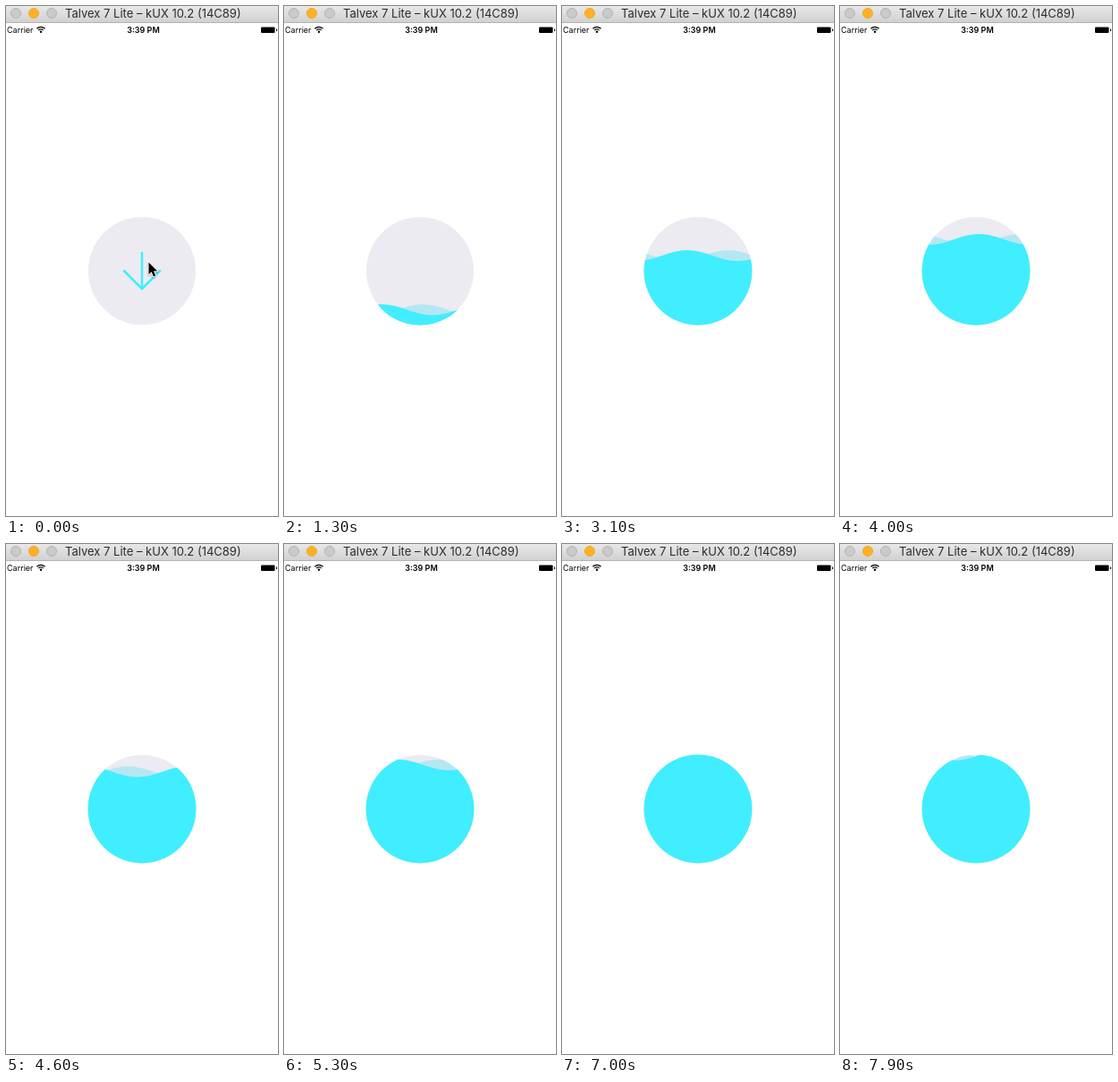
Animation of 304 by 568 pixels, one loop 8000 ms. Source, as an HTML page with a canvas:

```html
<!DOCTYPE html>
<html lang="en">
<head>
<meta charset="utf-8">
<title>Liquid download button</title>
<style>
  html, body { margin: 0; width: 100%; height: 100%; overflow: hidden; background: #fff; }
  canvas { display: block; width: 304px; height: 568px; }
</style>
</head>
<body>
<canvas id="stage" width="304" height="568"></canvas>
<script>
const ctx = document.getElementById('stage').getContext('2d');
const W = 304, H = 568, LOOP = 8000, STEP = 100;
const CX = 152, CY = 295, R = 60, WATER_R = 60.4;
const CYAN = '#40eeff', PALE = '#b5e7f2', DISC = '#ebebf1';
const FONT = 'Inter, Roboto, sans-serif';
const WAVE = { length: 113, height: 6, speed: -108.5, lead: 46 };

// Mean water height: [time in ms, y]
const LEVELS = [[700, 361], [2100, 308], [3100, 278], [4000, 260],
                [5300, 246], [6200, 236], [7000, 235]];

function levelAt(t) {
  if (t <= LEVELS[0][0]) return LEVELS[0][1];
  for (let i = 1; i < LEVELS.length; i++) {
    const [t0, y0] = LEVELS[i - 1], [t1, y1] = LEVELS[i];
    if (t <= t1) return y0 + (y1 - y0) * (t - t0) / (t1 - t0);
  }
  return LEVELS[LEVELS.length - 1][1];
}

function disc(x, y, r, fill, stroke) {
  ctx.beginPath();
  ctx.arc(x, y, r, 0, Math.PI * 2);
  ctx.fillStyle = fill;
  ctx.fill();
  if (!stroke) return;
  ctx.strokeStyle = stroke;
  ctx.lineWidth = 1;
  ctx.stroke();
}

function label(text, x, y, font, color, align = 'left') {
  ctx.font = `${font} ${FONT}`;
  ctx.fillStyle = color;
  ctx.textAlign = align;
  ctx.fillText(text, x, y);
}

function trace(points) {
  ctx.beginPath();
  points.forEach(([x, y], i) => i ? ctx.lineTo(x, y) : ctx.moveTo(x, y));
}

function titleBar() {
  const shade = ctx.createLinearGradient(0, 0, 0, 18);
  shade.addColorStop(0, '#e8e8e8');
  shade.addColorStop(1, '#d1d1d1');
  ctx.fillStyle = shade;
  ctx.fillRect(0, 0, W, 18);
  ctx.fillStyle = '#b3b3b3';
  ctx.fillRect(0, 18, W, 1);
  disc(11, 8, 5.5, '#cacaca', '#b4b4b4');
  disc(31, 8, 5.5, '#fdb225', '#f0a823');
  disc(51, 8, 5.5, '#cacaca', '#b4b4b4');
  label('Talvex 7 Lite – kUX 10.2 (14C89)', 66, 13, '13px', '#2c2c2c');
}

function statusBar() {
  label('Carrier', 1, 30, '9px', '#000');
  label('3:39 PM', 153.5, 30, '600 9px', '#000', 'center');

  ctx.strokeStyle = '#000';
  ctx.lineWidth = 1.3;
  for (const r of [3.6, 6.2]) {
    ctx.beginPath();
    ctx.arc(39, 29.5, r, -Math.PI * 0.76, -Math.PI * 0.24);
    ctx.stroke();
  }
  disc(39, 28.8, 1.2, '#000');

  ctx.fillStyle = '#000';
  ctx.beginPath();
  ctx.roundRect(285, 23.5, 15.5, 6.5, 1);
  ctx.fill();
  ctx.fillRect(302, 25.5, 1, 2.5);
}

function arrow(alpha) {
  ctx.save();
  ctx.globalAlpha = alpha;
  ctx.strokeStyle = CYAN;
  ctx.lineWidth = 2.5;
  ctx.lineCap = ctx.lineJoin = 'round';
  trace([[152, 275], [152, 315], [132, 295]]);
  ctx.moveTo(152, 315);
  ctx.lineTo(172, 295);
  ctx.stroke();
  ctx.restore();
}

function cursor() {
  ctx.save();
  ctx.translate(159.5, 285.5);
  ctx.scale(0.9, 0.9);
  trace([[0, 0], [0, 15], [3.4, 11.8], [6, 17.6], [8.6, 16.4], [6.1, 10.8], [10.8, 10.8]]);
  ctx.closePath();
  ctx.lineJoin = 'round';
  ctx.lineWidth = 2;
  ctx.strokeStyle = '#fff';
  ctx.shadowColor = 'rgba(0,0,0,.3)';
  ctx.shadowBlur = 2;
  ctx.shadowOffsetY = 1;
  ctx.stroke();
  ctx.shadowColor = 'transparent';
  ctx.fillStyle = '#000';
  ctx.fill();
  ctx.restore();
}

function wave(level, crest, color) {
  const left = CX - R - 1, right = CX + R + 1, bottom = CY + R + 1;
  ctx.beginPath();
  ctx.moveTo(left, bottom);
  for (let x = left; x <= right; x++) {
    ctx.lineTo(x, level - WAVE.height * Math.cos((x - crest) / WAVE.length * Math.PI * 2));
  }
  ctx.lineTo(right, bottom);
  ctx.fillStyle = color;
  ctx.fill();
}

function water(t) {
  const level = levelAt(t);
  const crest = 135.5 + WAVE.speed * (t - 2100) / 1000;
  ctx.save();
  ctx.beginPath();
  ctx.arc(CX, CY, WATER_R, 0, Math.PI * 2);
  ctx.clip();
  wave(level, crest + WAVE.lead, PALE);
  wave(level, crest, CYAN);
  ctx.restore();
}

function draw(t) {
  ctx.fillStyle = '#fff';
  ctx.fillRect(0, 0, W, H);
  titleBar();
  statusBar();
  disc(CX, CY, R, DISC);
  if (t < 200) {
    arrow(1 - t / 200);
    cursor();
  }
  if (t >= 700) water(t);
}

const start = performance.now();
function tick() {
  const t = (performance.now() - start) % LOOP;
  draw(Math.floor(t / STEP) * STEP);
  requestAnimationFrame(tick);
}
tick();
</script>
</body>
</html>
```
